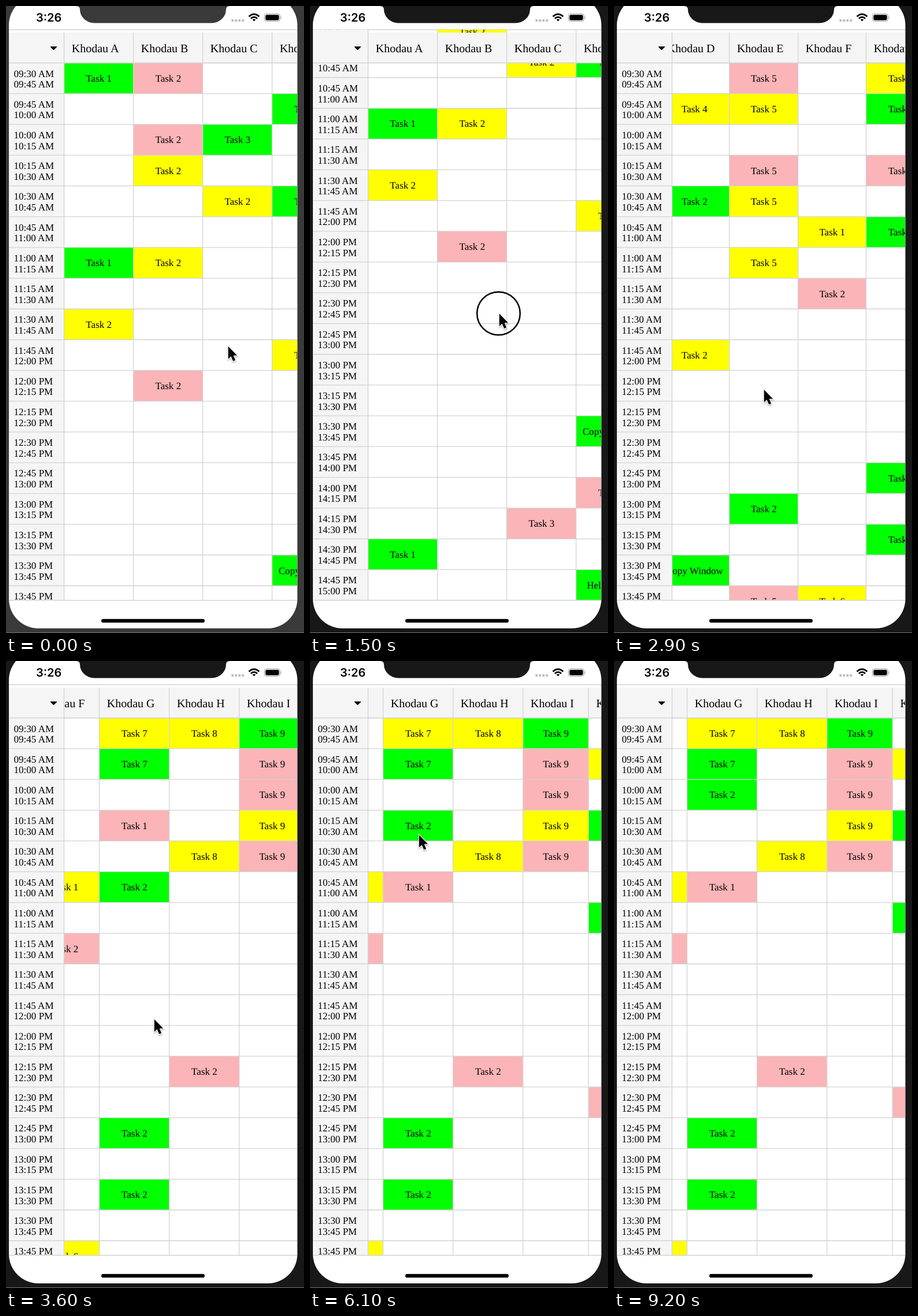
These frames come from a looping animation (516 px wide and 1085 px high, 9.3 s). An HTML page:

```html
<!DOCTYPE html>
<html lang="en">
<head>
<meta charset="utf-8">
<title>Schedule</title>
<style>
html, body { margin: 0; width: 100%; height: 100%; overflow: hidden; background: #181818; }
svg { display: block; width: 516px; height: 1085px; }
text {
  font: 17.07px "Liberation Serif", "Times New Roman", serif;
  font-kerning: normal; text-rendering: geometricPrecision; fill: #000;
}
.head { font-size: 20px; }
.clock { font: 600 20px Inter, "Liberation Sans", sans-serif; }
.line { stroke: #d3d3d3; stroke-width: 1.3; fill: none; }
</style>
</head>
<body>
<svg viewBox="0 0 516 1085" xmlns="http://www.w3.org/2000/svg">
  <defs>
    <clipPath id="tableClip"><rect x="5" y="41" width="499" height="987.5"/></clipPath>
    <clipPath id="bodyClip"><rect x="100" y="41" width="404" height="987.5"/></clipPath>
    <clipPath id="headClip"><rect x="100" y="46" width="404" height="53"/></clipPath>
    <filter id="shadow" x="-50%" y="-50%" width="200%" height="200%">
      <feDropShadow dx="0" dy="1.5" stdDeviation="1.3" flood-opacity=".4"/>
    </filter>
  </defs>
  <rect id="bezel" width="516" height="1085"/>
  <rect y="1084" width="516" height="1" fill="#777"/>
  <rect x="5" y="-18" width="499.5" height="1095" rx="51" fill="#fff"/>

  <path class="line" d="M5 41H504"/>
  <g clip-path="url(#bodyClip)"><g id="body"></g></g>
  <g clip-path="url(#tableClip)"><g id="labels"></g></g>
  <rect x="5" y="46" width="499" height="52.5" fill="#f5f5f5"/>
  <g clip-path="url(#headClip)"><g id="heads"></g></g>
  <path class="line" d="M5 98.5H504M100.5 46V98.5M5 1028.5H504"/>
  <path d="M77.5 70H87.5Q88.5 70 88 71L83.3 75.7Q82.5 76.3 81.7 75.7L77 71Q76.5 70 77.5 70Z"/>

  <path id="notch" d="M121 0Q128 0 128 6A25 23.5 0 0 0 153 29.5H356A25 23.5 0 0 0 381 6Q381 0 388 0Z"/>
  <text class="clock" x="52" y="27.3">3:26</text>
  <g fill="#bcbcbc" id="dots"></g>
  <g fill="none" stroke="#000" stroke-width="2.7">
    <path d="M420.6 18.2Q429.5 10.2 438.4 18.2M423.9 21.7Q429.5 16.6 435.1 21.7"/>
    <path d="M426.7 23.6Q429.5 21.6 432.3 23.6L429.5 26.6Z" fill="#000" stroke="none"/>
  </g>
  <rect x="447.5" y="13.5" width="27" height="13" rx="4" fill="none" stroke="#a0a0a0" stroke-width="1.2"/>
  <rect x="449.3" y="15.3" width="23.4" height="9.4" rx="2.4"/>
  <path d="M476 17.8Q478.2 20 476 22.2Z" fill="#a0a0a0"/>
  <rect x="165" y="1060.8" width="179" height="6.2" rx="3.1"/>

  <circle id="press" r="37.3" fill="none" stroke="#000" stroke-width="2.5"/>
  <path id="cursor" d="M.8 1V22.8L5.6 18.3L9.2 26.6L13.2 24.9L9.7 16.8H16.2Z"
    stroke="#fff" stroke-width="2" paint-order="stroke" filter="url(#shadow)"/>
</svg>
<script>
const LOOP = 9300, STEP = 100;
const TOP = 98.5, LEFT = 100.5, ROW = 53.22, ROWS = 22, PAD = 38.4;
const FILL = { g: '#00ff00', y: '#ffff00', p: '#fbb4b7' };

// One line per column: a letter per row for its colour, then the task of each filled row
const COLUMNS = [
  'g.....g.y...........g 1 1 2 1',
  'p.py..y...p 2 2 2 2 2',
  '..g.y..............p 3 2 3',
  '.g..g....y......g.p..g 4 2 2 Copy_Window 2 Hello_World',
  'p..py', // filled in below with the rest of its pattern
  '.....y.p.........y 1 2 6',
  'yg.p.g.......g.g 7 7 1 2 2 2',
  'y...y......p 8 8 2',
  'gppyp 9 9 9 9 9',
  '.y.g..g.....p 10 10 10 10'
];
COLUMNS[4] = 'py.py.y.......g..p 5 5 5 5 5 2 5';

// Pressed drags: start and end time, then start and end point
const DRAGS = [
  [800, 1100, 340, 650, 335, 500],
  [1500, 1800, 327, 531.5, 318, 700],
  [2200, 2650, 395, 672, 259, 663],
  [3150, 3450, 380, 628, 256, 619],
  [5000, 5700, 204, 403, 190, 300],
  [6200, 6700, 188, 300, 177, 255]
];
const REST = [384, 588], HIDE = 7400;
const [UP, DOWN, SWIPE, FLICK, SWAP, DROP] = DRAGS;

const $ = id => document.getElementById(id);
const clamp = k => Math.min(1, Math.max(0, k));
const mix = (a, b, k) => a + (b - a) * k;
const glide = (t, from, ms) => 1 - (1 - clamp((t - from) / ms)) ** 2;
const rowY = r => TOP + r * ROW;

function add(parent, tag, attrs, content) {
  const el = document.createElementNS('http://www.w3.org/2000/svg', tag);
  for (const k in attrs) el.setAttribute(k, attrs[k]);
  if (content) el.textContent = content;
  parent.appendChild(el);
  return el;
}

const move = (el, x, y) => el.setAttribute('transform', `translate(${x} ${y})`);

// Columns are as wide as their heading plus padding
const colX = [LEFT], cells = {};
let grid = '';
COLUMNS.forEach((column, c) => {
  const x = colX[c], letter = String.fromCharCode(65 + c);
  add($('heads'), 'path', { class: 'line', d: `M${x} 46V${TOP}` });
  const head = add($('heads'), 'text', { class: 'head', x: x + 13.2, y: 80 }, 'Khodau ' + letter);
  const w = head.getComputedTextLength() + PAD;
  colX.push(x + w);
  grid += `M${x} ${TOP}V${rowY(ROWS)}`;

  const [tints, ...names] = column.split(' ');
  [...tints].forEach((tint, r) => {
    if (tint === '.') return;
    const name = names.shift();
    const cell = add($('body'), 'g', {});
    add(cell, 'rect', { width: w, height: ROW, fill: FILL[tint] });
    add(cell, 'text', { x: w / 2 + .2, y: 32.5, 'text-anchor': 'middle' },
      isNaN(name) ? name.replace('_', ' ') : 'Task ' + name);
    move(cell, x, rowY(r));
    cells[letter + r] = cell;
  });
});
for (let r = 0; r <= ROWS; r++) grid += `M${LEFT} ${rowY(r)}H${colX[COLUMNS.length]}`;
add($('body'), 'path', { class: 'line', d: grid });

const clock = q => {
  const h = Math.floor(q / 4), m = q % 4 * 15;
  return `${String(h).padStart(2, '0')}:${String(m).padStart(2, '0')} ${h < 12 ? 'AM' : 'PM'}`;
};
add($('labels'), 'rect', { x: 5, y: TOP, width: 95.5, height: ROWS * ROW, fill: '#f5f5f5' });
let rules = `M${LEFT} ${TOP}V${rowY(ROWS)}`;
for (let r = 0; r < ROWS; r++) {
  for (let i = 0; i < 2; i++)
    add($('labels'), 'text', { x: 13.5, y: rowY(r) + 24.1 + i * 18.67 }, clock(38 + r + i));
  rules += `M5 ${rowY(r + 1)}H${LEFT}`;
}
add($('labels'), 'path', { class: 'line', d: rules });

for (let i = 0; i < 4; i++) add($('dots'), 'circle', { cx: 392.3 + i * 6, cy: 25, r: 2.2 });

// Between drags the pointer rests, then travels to the next start
function pointer(t) {
  let time = 0, [x, y] = REST;
  for (const [from, to, x0, y0, x1, y1] of DRAGS) {
    if (t < from) {
      const k = clamp(((t - time) / (from - time) - .5) / .3);
      return [mix(x, x0, k), mix(y, y0, k)];
    }
    if (t < to) {
      const k = (t - from) / (to - from);
      return [mix(x0, x1, k), mix(y0, y1, k)];
    }
    [time, x, y] = [to, x1, y1];
  }
  return [x, y];
}

const END_Y = rowY(ROWS) - 1028.5, END_X = colX[6] - 126.5, FLICK_X = 310;

function draw(t) {
  const sy = END_Y * (glide(t, UP[0], 600) - glide(t, DOWN[0], 550));
  const sx = (END_X - FLICK_X) * glide(t, SWIPE[0], 680) + FLICK_X * glide(t, FLICK[0], 678);
  move($('body'), -sx, -sy);
  move($('heads'), -sx, 0);
  move($('labels'), 0, -sy);

  const bezel = t < 700 ? '#3a3a3a' : '#181818';
  $('bezel').setAttribute('fill', bezel);
  $('notch').setAttribute('fill', bezel);
  cells.D1.firstChild.setAttribute('fill', t < DOWN[0] ? FILL.g : FILL.y);

  const swapped = t >= SWAP[1], dropped = t >= DROP[1];
  move(cells.G3, colX[6], rowY(swapped ? 5 : 3));
  move(cells.G5, colX[6], rowY(dropped ? 2 : swapped ? 3 : 5));

  const [px, py] = pointer(t);
  move($('cursor'), px, py);
  move($('press'), px - .5, py + .5);
  $('cursor').style.display = t < HIDE ? '' : 'none';
  $('press').style.display = DRAGS.some(([a, b]) => t >= a && t < b) ? '' : 'none';
}

const start = performance.now();
function tick() {
  const t = (performance.now() - start) % LOOP;
  draw(Math.floor(t / STEP) * STEP);
  requestAnimationFrame(tick);
}
draw(0);
requestAnimationFrame(tick);
</script>
</body>
</html>
```
